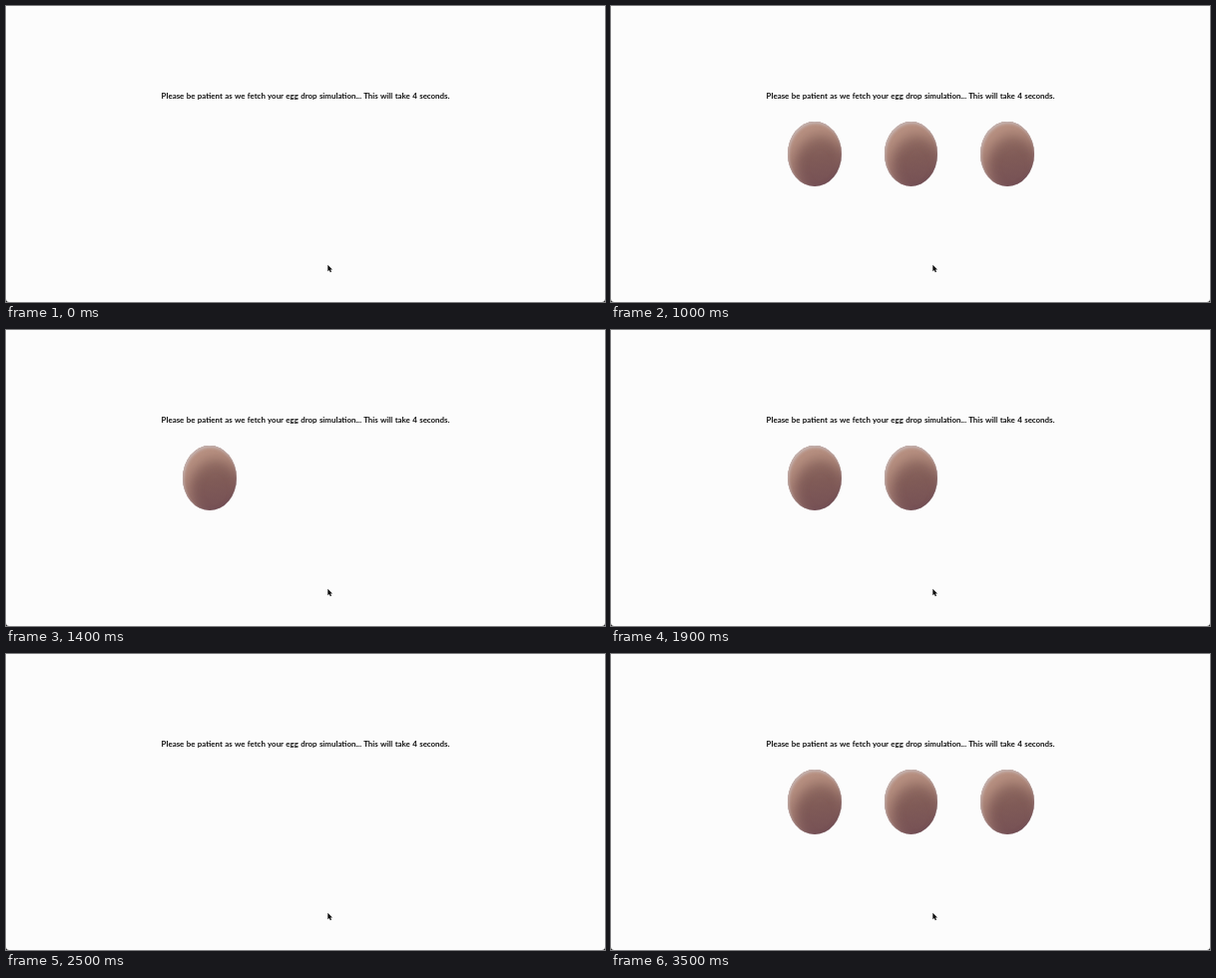
Recreate the animation shown at these times as an HTML page. Size 600 by 297 pixels, loop 3.6 s.

```html
<!DOCTYPE html>
<html lang="en">
<head>
<meta charset="utf-8">
<title>Egg drop loader</title>
<style>
  html, body { margin: 0; width: 100%; height: 100%; overflow: hidden; background: #fcfcfc; }
  body { position: relative; }
  p {
    position: absolute; left: 0; top: 84px; width: 600px; margin: 0;
    font: 700 7.9px/13px Nunito, Lato, sans-serif; word-spacing: .06em;
    text-align: center; white-space: nowrap; color: #111;
  }
  .egg {
    position: absolute; top: 116.3px; width: 53.8px; height: 65.2px; border-radius: 50%;
    background: linear-gradient(172deg, #8f6a61 25%, #805b57 55%, #755055 100%);
    box-shadow:
      inset 1px 2px 3px rgba(205, 205, 212, .6),
      inset 6px 12px 13px rgba(200, 160, 143, .75),
      inset -1px -1px 3px rgba(105, 72, 84, .5);
  }
  svg { position: absolute; left: 0; top: 0; }
</style>
</head>
<body>
<p>Please be patient as we fetch your egg drop simulation... This will take 4 seconds.</p>
<div class="egg" style="left:177.2px"></div>
<div class="egg" style="left:273.5px"></div>
<div class="egg" style="left:369.8px"></div>
<svg width="600" height="297">
  <path d="M322.3 259.8v6.4l1.5-1.3 1 2.3 1.2-.5-1-2.2h2z" fill="#111" stroke="#fff" stroke-width=".5" paint-order="stroke"/>
  <path d="M0 294v3h3q-3 0-3-3zM600 294v3h-3q3 0 3-3z" fill="#222"/>
</svg>
<script>
  const LOOP = 3600;
  // Each step adds one egg; every fourth step clears them all.
  const steps = [100, 500, 800, 1200, 1400, 1700, 2100, 2500, 2700, 3000, 3300];
  const eggs = document.querySelectorAll('.egg');
  const start = performance.now();

  function draw() {
    const time = (performance.now() - start) % LOOP;
    const count = steps.filter(step => step <= time).length % 4;
    eggs.forEach((egg, i) => { egg.style.visibility = i < count ? 'visible' : 'hidden'; });
    requestAnimationFrame(draw);
  }
  draw();
</script>
</body>
</html>
```
